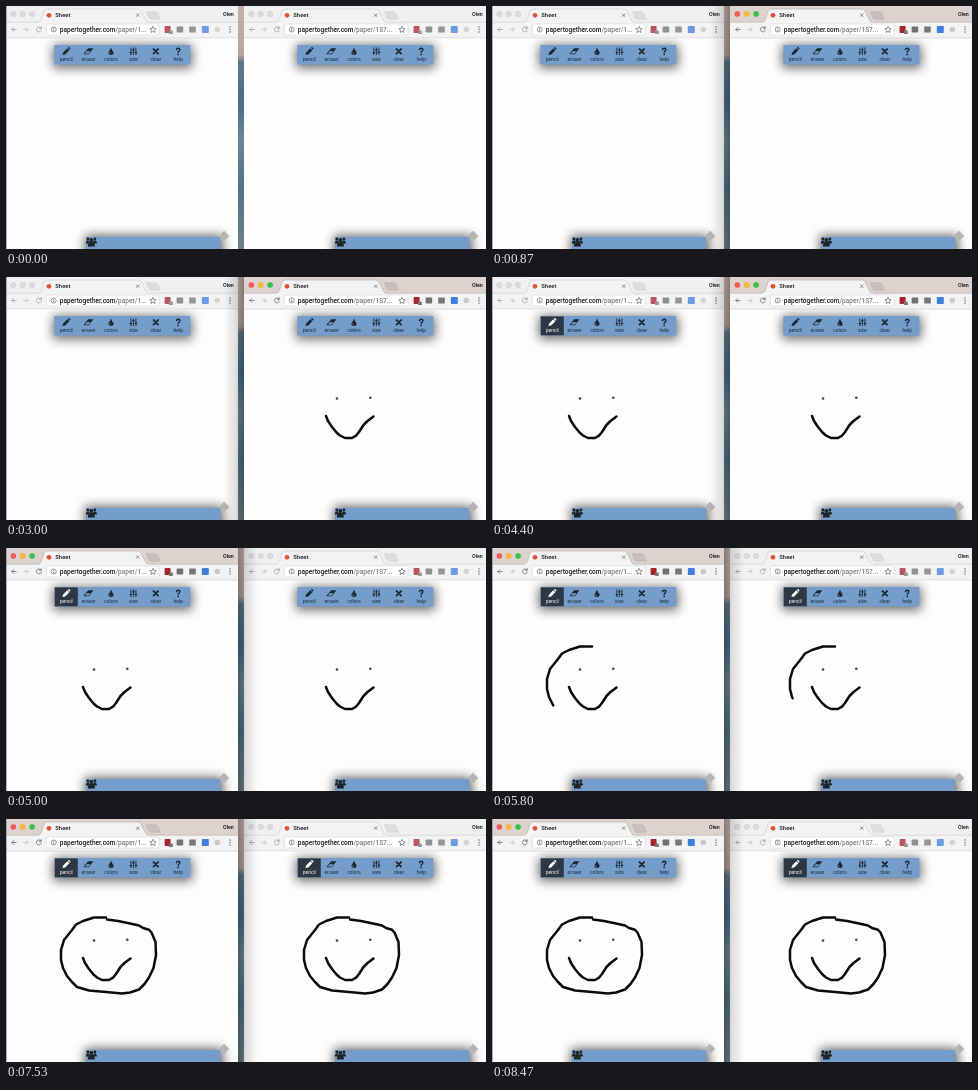
An HTML page for the animation above (8540 ms loop, 480 by 243 pixels).

```html
<!DOCTYPE html>
<html lang="en">
<head>
<meta charset="utf-8">
<title>Shared sheet</title>
<style>
  html, body { margin: 0; width: 100%; height: 100%; overflow: hidden; background: #fff; }
  #stage { display: block; width: 100vw; height: 100vh; }
  text { font-family: Roboto, "Liberation Sans", sans-serif; font-weight: 500; }
  .ink { fill: none; stroke: #0b0b0d; stroke-width: 2.5; stroke-linecap: round; stroke-linejoin: round; }
  .line { fill: none; stroke: currentColor; stroke-linecap: round; }
  .label { font: 5px "Liberation Sans", Arial, sans-serif; text-anchor: middle; }
</style>
</head>
<body>
<svg id="stage" viewBox="0 0 480 243" preserveAspectRatio="none">
  <defs>
    <linearGradient id="wall" x2="0" y2="1">
      <stop offset="0" stop-color="#c6b0a8"/>
      <stop offset=".2" stop-color="#b9a49c"/>
      <stop offset=".23" stop-color="#5f7a8d"/>
      <stop offset=".4" stop-color="#466c88"/>
      <stop offset=".55" stop-color="#6b8797"/>
      <stop offset=".75" stop-color="#507389"/>
      <stop offset="1" stop-color="#6f8189"/>
    </linearGradient>
    <linearGradient id="shade">
      <stop offset="0" stop-opacity=".3"/>
      <stop offset=".4" stop-opacity=".12"/>
      <stop offset="1" stop-opacity="0"/>
    </linearGradient>
    <filter id="soft" x="-30%" y="-150%" width="160%" height="400%">
      <feGaussianBlur stdDeviation="5.5"/>
    </filter>
  </defs>
</svg>
<script>
const LOOP = 8540;
const LAG = 48;
const stage = document.getElementById('stage');

const MOUTH = [[77,139],[79,144],[83,150],[87.5,155.5],[91,158.5],[96,161],[103,161],[107,158.7],
  [110,155],[114.5,148],[118.5,144],[124.5,139.5]];
const HEAD = [[100,98.5],[88,98.5],[77,102],[70,105.5],[66,111],[58,121],[55,131],[55,141],[57,149],
  [61,157],[66,163],[71,168],[83,171.5],[100,173],[116,174.5],[124,173.5],[133,170.5],[138.5,165],
  [143,158.5],[147.5,149],[150,136],[149.5,123],[145.5,113.5],[143,110.8],[137,109],[133,106.5],
  [124,104.5],[112,102],[101,100.5]];
const HEAD_STEPS = [[5270,0],[5800,89],[6300,150],[6600,230],[6950,280]];

const rect = (x, y, w, h, fill, more = '') =>
  `<rect x="${x}" y="${y}" width="${w}" height="${h}" fill="${fill}" ${more}/>`;
const dot = (x, y, r, fill, more = '') => `<circle cx="${x}" cy="${y}" r="${r}" fill="${fill}" ${more}/>`;
const line = (d, width = 1, color = 'currentColor') =>
  `<path class="line" d="${d}" style="stroke:${color};stroke-width:${width}"/>`;
const text = (x, y, size, fill, s) => `<text x="${x}" y="${y}" font-size="${size}" fill="${fill}">${s}</text>`;

// Tool icons, each centred on 0,0
const ICONS = {
  pencil: '<path d="M-4.2 4.2l.8-3 4.6-4.6 2.3 2.3-4.6 4.6zM1.8-4l.7-.6q.6-.3 1.1.1l1 1q.4.5 0 1l-.6.7z" fill="currentColor"/>',
  eraser: '<path d="M-5.2 2.3L-.4-3.3H5.3L.6 2.9-.2 3.4H-4.8Q-5.6 3-5.2 2.3z" fill="currentColor"/>' +
    '<path d="M-4.3 2.4l2.2-2.5H2.2L.1 2.4z" fill="#7a9fca"/>',
  colors: '<path d="M0-4.3Q.7-2 2.2 0 3.2 1.4 2.8 2.4 2.2 4.2 0 4.2T-2.8 2.4Q-3.2 1.4-2.2 0-.7-2 0-4.3z" fill="currentColor"/>' +
    line('M-1.5 1.6q0 1.2 1 1.4', .7, '#7a9fca'),
  size: line('M-2.8-3.8V3.8M0-3.8V3.8M2.8-3.8V3.8', 1) + line('M-3.6 1.4h1.6M-.8-1.6h1.6M2 1.2h1.6', 1.5),
  clear: line('M-2.5-2.5L2.5 2.5M2.5-2.5L-2.5 2.5', 2.1),
  help: line('M-2-1.8Q-1.7-3.4 0-3.4 2-3.3 2-1.7 1.9-.7.8-.2 0 .3 0 1.2', 1.5) + dot(0, 3.5, .95, 'currentColor')
};

const tool = (name, i, color) => `<g transform="translate(${60.2 + i * 22.4} 45.3)" style="color:${color}">
  <g transform="scale(.9)">${ICONS[name]}</g><text class="label" y="9.5" fill="${color}">${name}</text></g>`;

function chrome(dx, url, active) {
  const bar = active ? '#ddd2ce' : '#f1f0f1';
  const lights = active ? ['#fb5b53', '#fbbc30', '#34c546'] : ['#dcdcdc', '#dcdcdc', '#dcdcdc'];
  const edge = active ? '#b3a9a6' : '#cccaca';
  const nav = active ? '#6a6a6a' : '#a0a0a0';
  const w = 232 + dx;
  return rect(0, 0, w, 17, bar) +
    lights.map((c, i) => dot(7.3 + i * 9.4, 8, 2.7, c, `stroke="${active ? '#0002' : '#c6c6c6'}" stroke-width=".4"`)).join('') +
    `<path d="M140.3 5.8h9.7q1 0 1.5 1l2.8 6.4h-9.7q-1 0-1.5-1z" fill="${active ? '#cabfbc' : '#dfdddd'}" stroke="${edge}" stroke-width=".5"/>` +
    rect(0, 16, w, 16, '#f4f3f4') +
    `<path d="M0 16.2H32Q34.5 16 35.5 13L38 5Q38.8 3 41 3H132Q134 3 135 5L139 13Q140 16.2 142.5 16.2H${w}" fill="#f4f3f4" stroke="${edge}" stroke-width=".6"/>` +
    rect(35, 15.5, 104, 2, '#f4f3f4') +
    dot(43, 9.3, 2.4, '#e0552f') + text(49.3, 11.2, 5.9, '#1c1c1c', 'Sheet') +
    line('M130.3 7.8l2.8 2.8M133.1 7.8l-2.8 2.8', .7, '#666') +
    text(217 + dx, 10, 5.3, '#111', 'Olen') +
    line('M10.2 23.5H5.8M7.8 21.5l-2 2 2 2', .8, nav) +
    line('M17.8 23.5h4.4M20.2 21.5l2 2-2 2', .8, '#c4c4c4') +
    line('M35 22A2.5 2.5 0 1 0 35.3 24.2M35.2 20.7V22.4H33.5', .8, nav) +
    rect(40.5, 18, 112.5 + dx, 11, '#fff', 'rx="1.5" stroke="#d0cfd0" stroke-width=".5"') +
    dot(47.7, 23.5, 2.5, 'none', 'stroke="#555" stroke-width=".6"') + line('M47.7 23.3v1.4M47.7 22v.1', .7, '#555') +
    `<text x="53.8" y="25.8" font-size="6.55" fill="#1a1a1a">papertogether.com<tspan fill="#7c7c7c">${url}</tspan></text>` +
    `<g transform="translate(${dx} 0)">` +
    '<path d="M147 20.3l1 2.2 2.2.2-1.7 1.5.5 2.3-2-1.2-2 1.2.5-2.3-1.7-1.5 2.2-.2z" fill="none" stroke="#666" stroke-width=".7"/>' +
    `<g opacity="${active ? 1 : .75}">` +
    rect(158.6, 20, 6, 7, '#a3242b', 'rx=".8"') + rect(163, 24.4, 3.8, 3.6, '#777', 'rx=".5"') +
    rect(170.6, 20.5, 6.6, 6, '#707070', 'rx="1"') +
    rect(183.2, 20.6, 6.6, 5.8, '#777', 'rx=".5"') +
    rect(195.8, 20, 7, 7, '#3f7edb', 'rx=".8"') +
    dot(211.3, 23.5, 2.8, '#cacaca') + '</g>' +
    [21, 23.5, 26].map(y => dot(224, y, .75, '#666')).join('') + '</g>' +
    rect(0, 31.6, w, .6, '#cfcdce');
}

function page(dx) {
  const names = Object.keys(ICONS);
  const w = 232 + dx;
  const poly = (name, pts) => `<polyline class="ink ${name}" points="${pts.join(' ')}"/>`;
  return `<svg x="0" y="32" width="${w}" height="211" viewBox="0 32 ${w} 211">` +
    rect(0, 32, w, 211, '#fefdfe') +
    `<g transform="translate(${Math.floor(dx / 2)} 0)">` +
    rect(47, 39, 139, 23, '#000', 'opacity=".58" filter="url(#soft)"') +
    rect(48.3, 39, 136, 19.5, '#759dcb') +
    names.map((n, i) => tool(n, i, '#1d2733')).join('') +
    `<g class="pick">${rect(48.8, 39.4, 23, 18.9, '#2d3844')}${tool('pencil', 0, '#fff')}</g>` +
    dot(88, 121.5, 1.3, '#444', 'class="eye1"') + dot(121.3, 120.8, 1.3, '#444', 'class="eye2"') +
    poly('mouth', MOUTH) + poly('head', HEAD) + '</g>' +
    `<g transform="translate(${dx} 0)">` +
    rect(79, 229.5, 138, 40, '#000', 'opacity=".62" filter="url(#soft)"') +
    rect(80, 231, 134.3, 13, '#759dcb') +
    '<g fill="#1d2426">' + [[81.9, 233], [88.9, 233], [85.4, 234]].map(([x, y], i) =>
      dot(x, y, i < 2 ? 1.4 : 2) + `<path d="M${x - 2} ${y + 4.6}q0-3 2-3t2 3z"/>`).join('') +
    '<path d="M82 240.6q-.5-4.6 3.4-4.6t3.4 4.6z"/></g>' +
    rect(214.3, 226.3, 7.4, 7.4, '#b4b4b5', 'transform="rotate(45 218 230)"') +
    '</g></svg>';
}

function addWindow(id, x, dx, url) {
  stage.insertAdjacentHTML('beforeend', `<g id="${id}" transform="translate(${x} 0)">${page(dx)}
    ${chrome(dx, url, false)}<g class="focus">${chrome(dx, url, true)}</g></g>`);
}

const play = (el, frames) => el.animate(frames, { duration: LOOP, iterations: Infinity });

// Shown from one time to another, with hard cuts
function show(sel, from, to = LOOP) {
  const key = (t, opacity) => ({ offset: t / LOOP, opacity, easing: 'step-end' });
  const frames = [key(0, 0), key(from, 1)];
  if (to < LOOP) frames.push(key(to, 0));
  frames.push(key(LOOP, to < LOOP ? 0 : 1));
  document.querySelectorAll(sel).forEach(el => play(el, frames));
}

// Steps are [time, drawn length]
function draw(sel, steps, lag = 0) {
  const el = document.querySelector(sel);
  const len = el.getTotalLength();
  el.style.strokeDasharray = `${len} ${len * 2}`;
  const key = (t, n) => ({ offset: t / LOOP, strokeDashoffset: len - Math.min(n, len) });
  const timed = steps.map(([t, n]) => key(t + lag, n));
  play(el, [key(0, 0), ...timed, key(LOOP, len)]);
  show(sel, steps[0][0] + lag);
}

stage.insertAdjacentHTML('beforeend', rect(0, 0, 480, 243, 'url(#wall)'));
addWindow('left', 0, 0, '/paper/1...');
addWindow('right', 238, 11, '/paper/1S7...');
// The focused window casts a shadow over the other one
stage.insertAdjacentHTML('beforeend', rect(0, 0, .7, 243, '#8d9399') +
  rect(232, 0, 20, 243, 'url(#shade)', 'class="left-shade"') +
  rect(-238, 0, 20, 243, 'url(#shade)', 'class="right-shade" transform="scale(-1 1)"'));

show('#right .focus, .right-shade', 470, 4870);
show('#left .focus, .left-shade', 4870);
show('#right .eye1', 1130);
show('#right .eye2', 1470);
draw('#right .mouth', [[1870, 0], [2270, 45], [2670, 73]]);

show('#left .pick', 3130);
show('#left .eye1', 3130);
show('#left .eye2', 3330);
draw('#left .mouth', [[3470, 0], [3800, 45], [4100, 73]]);

draw('#left .head', HEAD_STEPS);
draw('#right .head', HEAD_STEPS, LAG);
show('#right .pick', HEAD_STEPS[0][0] + LAG);
</script>
</body>
</html>
```
